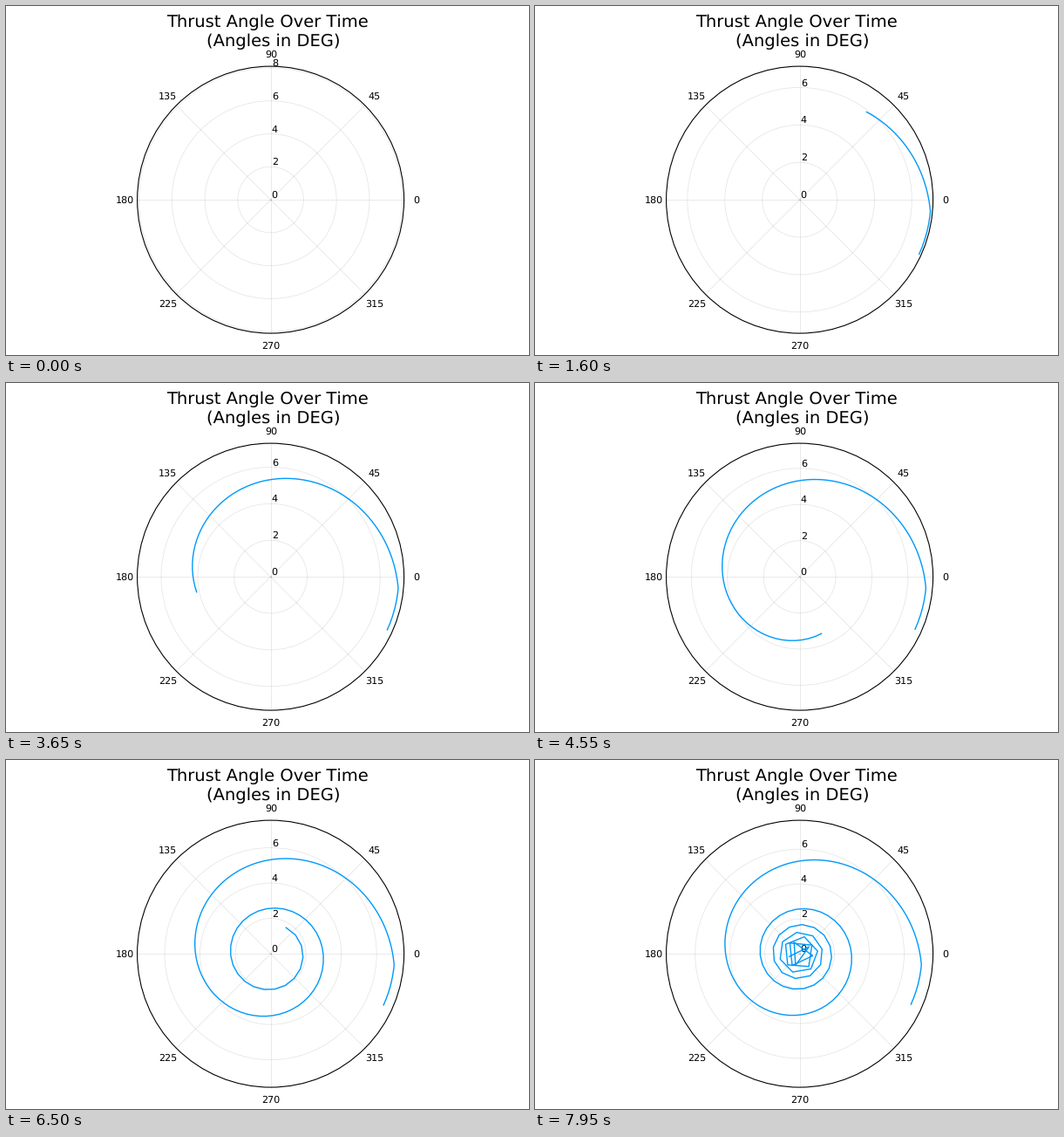
These frames come from a looping animation (600 px wide and 400 px high, 8 s). A matplotlib script:

```python
import numpy as np
import matplotlib.pyplot as plt
from matplotlib.animation import FuncAnimation
from matplotlib.patches import Circle

plt.rcParams["font.family"] = "DejaVu Sans"
plt.rcParams["text.hinting"] = "none"
plt.rcParams["text.kerning_factor"] = 6  # plain advances, no pair kerning

W, H, DPI = 600, 400, 100
FRAMES, STEP = 160, 50
CX, CY, R = 303.6, 222.1, 153
PX = 72 / DPI  # points per pixel
RAMP = 5       # samples at constant radius before the spiral starts
START = 7.02   # radius of those samples

fig = plt.figure(figsize=(W / DPI, H / DPI), dpi=DPI, facecolor="white")
ax = fig.add_axes([0, 0, 1, 1])
ax.set(xlim=(0, W), ylim=(H, 0))
ax.axis("off")


def spiral(k):
    """Angle in degrees and radius of sample k: a spiral closing on the centre."""
    left, miss = 168 - k, 12
    radius = np.minimum(START, 0.0432 * np.hypot(left, miss))
    angle = -236.7 + 0.56 * k + 37050 / miss * np.arctan2(miss, left)
    return angle, radius


def label(x, y, text, size=8):
    return ax.text(x, y, text, size=size, ha="center", va="baseline",
                   color="black", zorder=3)


k = np.arange(FRAMES)
angle, radius = spiral(k)
angle[:RAMP] = np.linspace(-24.7, angle[RAMP], RAMP + 1)[:RAMP]
angle = np.radians(angle)

label(300.3, 24, "Thrust Angle Over Time", 14)
label(306.3, 46, "(Angles in DEG)", 14)

angle_labels = [
    (0, 471, 226), (45, 423, 107), (90, 304, 59), (135, 185.5, 107),
    (180, 136.4, 226), (225, 185.5, 345), (270, 303.4, 393), (315, 422.5, 345),
]
for deg, x, y in angle_labels:
    label(x, y, str(deg))
    a = np.radians(deg)
    ax.plot([CX, CX + R * np.cos(a)], [CY, CY - R * np.sin(a)],
            color="black", alpha=0.1, lw=0.8 * PX, zorder=1)

ax.add_patch(Circle((CX, CY), R, fill=False, ec="black", lw=1.1 * PX, zorder=2))
label(308.3, CY - 2, "0")

rings = []
for value in (2, 4, 6, 8):
    ring = ax.add_patch(Circle((CX, CY), 1, fill=False, ec="black", alpha=0.1,
                               lw=0.8 * PX, zorder=1))
    rings.append((value, ring, label(308.3, CY, str(value))))

curve, = ax.plot([], [], color="#009AFA", lw=1.4 * PX, zorder=4,
                 solid_capstyle="butt", solid_joinstyle="round")


def draw(i):
    # the outer limit leaves a tenth of the radius range as margin
    limit = 8.1 if i == 0 else START + 0.1 * (START - radius[i])
    scale = R / limit
    for value, ring, text in rings:
        shown = value <= limit
        ring.set_visible(shown)
        text.set_visible(shown)
        ring.set_radius(value * scale)
        text.set_y(CY - value * scale - 2)
    n = i + 1 if i else 0
    curve.set_data(CX + scale * radius[:n] * np.cos(angle[:n]),
                   CY - scale * radius[:n] * np.sin(angle[:n]))
    return [curve]


anim = FuncAnimation(fig, draw, frames=FRAMES, interval=STEP, repeat=True,
                     repeat_delay=0, blit=False)
plt.show()
```
